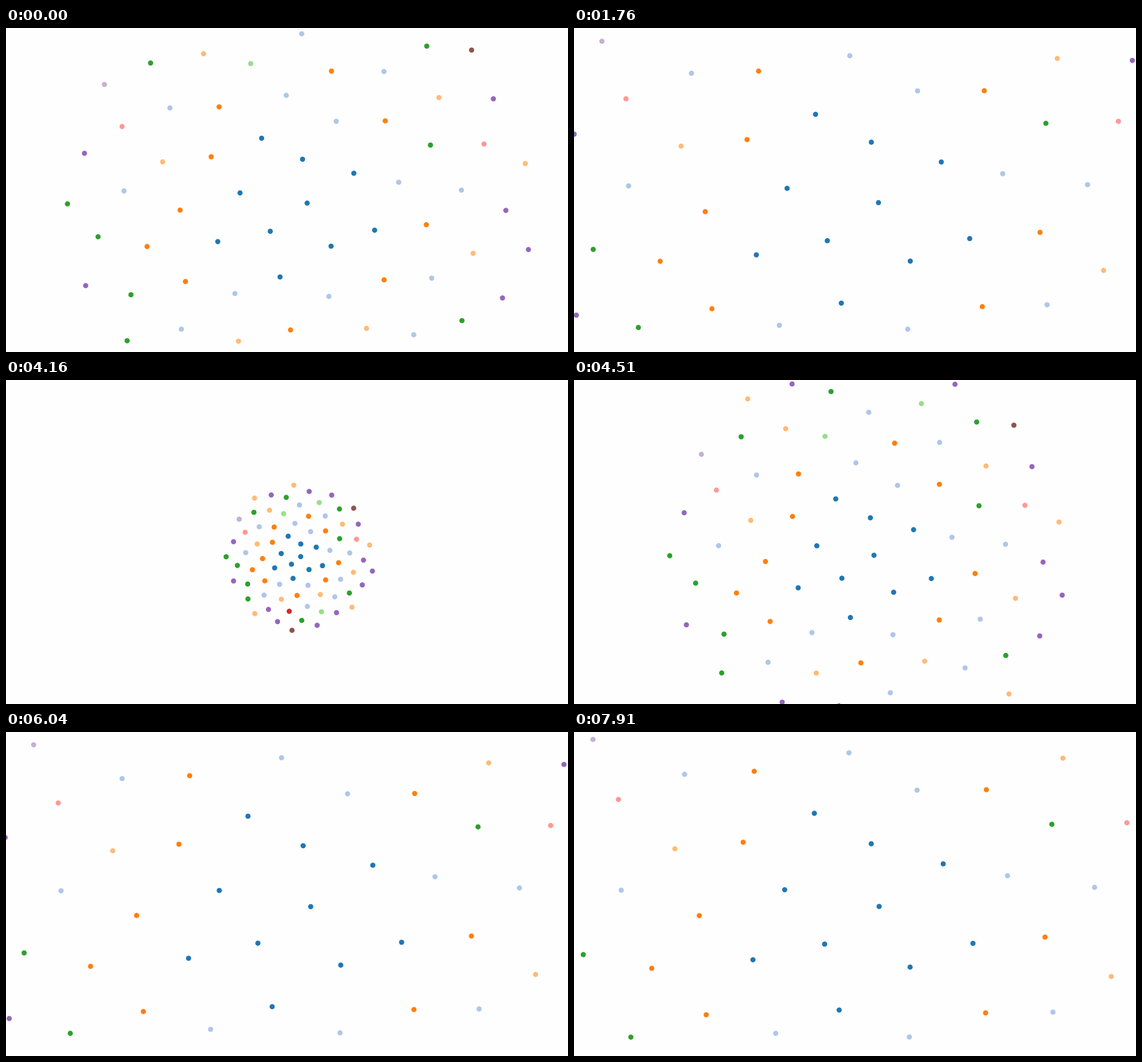
Recreate the animation shown at these times as an HTML page with a canvas. Size 921x532 px, loop 8 s.

```html
<!DOCTYPE html>
<html lang="en">
<head>
<meta charset="utf-8">
<title>Spreading dots</title>
<style>
  html, body { margin: 0; width: 100%; height: 100%; overflow: hidden; background: #fefefe; }
  canvas { display: block; width: 921px; height: 532px; }
</style>
</head>
<body>
<canvas id="stage" width="921" height="532"></canvas>
<script>
const ctx = document.getElementById('stage').getContext('2d');
const LOOP = 8000, CLEARED = 3720, RESTART = 4040;
const RADIUS = 4.25, CENTER = [481, 291];
const TICKS = 300, MS_PER_TICK = 16.4;
const DECAY = 1 - Math.pow(0.001, 1 / TICKS);
const COLORS = {
  a: '#1f77b4', b: '#aec7e8', c: '#ff7f0e', d: '#ffbb78', e: '#2ca02c', f: '#98df8a',
  g: '#d62728', h: '#ff9896', i: '#9467bd', j: '#c5b0d5', k: '#8c564b'
};
const GROUPS = 'aaaaaaaaaabbcbbbccccccccddedfbcbbbbbbbbdgddeffhhieeeeeeieiiiiiiiiiijddddekkdi';

const mean = list => list.reduce((a, b) => a + b, 0) / list.length;

// --- mutual repulsion over a quadtree; theta2 = 0 sums every pair exactly ---
function buildTree(dots, x, y, w) {
  if (dots.length === 1) return { x: dots[0].x, y: dots[0].y, n: 1, w, dot: dots[0] };
  const h = w / 2, parts = [[], [], [], []];
  for (const p of dots) parts[(p.y >= y + h) * 2 + (p.x >= x + h)].push(p);
  const kids = [];
  parts.forEach((part, i) => {
    if (part.length) kids.push(buildTree(part, x + (i & 1) * h, y + (i >> 1) * h, h));
  });
  const cell = { x: 0, y: 0, n: dots.length, w, kids };
  for (const k of kids) {
    cell.x += k.x * k.n / cell.n;
    cell.y += k.y * k.n / cell.n;
  }
  return cell;
}

function repel(p, cell, force, theta2) {
  const dx = cell.x - p.x, dy = cell.y - p.y, l = dx * dx + dy * dy;
  const far = cell.w * cell.w < l * theta2;
  if (!far && cell.kids) {
    for (const k of cell.kids) repel(p, k, force, theta2);
  } else if (cell.dot !== p) {
    p.vx -= force * cell.n * dx / l;
    p.vy -= force * cell.n * dy / l;
  }
}

// Dots start on a sunflower spiral and drift apart while the force cools down.
function simulate(theta2) {
  const turn = Math.PI * (3 - Math.sqrt(5));
  const dots = Array.from(GROUPS, (g, i) => ({
    x: 10 * Math.sqrt(i) * Math.cos(i * turn),
    y: 10 * Math.sqrt(i) * Math.sin(i * turn),
    vx: 0, vy: 0
  }));
  const states = [];
  for (let t = 0, alpha = 1; t <= TICKS; t++) {
    states.push(dots.map(p => [p.x, p.y]));
    alpha *= 1 - DECAY;
    const xs = dots.map(p => p.x), ys = dots.map(p => p.y);
    const x0 = Math.floor(Math.min(...xs)), y0 = Math.floor(Math.min(...ys));
    let size = 1;
    while (Math.max(...xs) > x0 + size || Math.max(...ys) > y0 + size) size *= 2;
    const root = buildTree(dots, x0, y0, size);
    for (const p of dots) repel(p, root, 30 * alpha, theta2);
    const mx = mean(xs), my = mean(ys);
    for (const p of dots) {
      p.x += (p.vx *= 0.6) - mx;
      p.y += (p.vy *= 0.6) - my;
    }
  }
  return states;
}

// --- a run is scaled and shifted so that three outer dots settle on given points ---
const ANCHORS = [46, 47, 11];

function makeRun(theta2, tick0, time0, aims) {
  const states = simulate(theta2);
  const pts = ANCHORS.map(n => states[220][n]);
  const centroid = list => [0, 1].map(k => mean(list.map(p => p[k])));
  const a = centroid(pts), b = centroid(aims);
  const size = (list, c) => Math.hypot(...list.map(p => Math.hypot(p[0] - c[0], p[1] - c[1])));
  const scale = size(aims, b) / size(pts, a);
  const shift = [0, 1].map(k => b[k] - CENTER[k] - a[k] * scale);
  return { states, tick0, time0, scale, shift };
}

const exactRun = makeRun(0, 29.6, 0, [[78.5, 114], [899.6, 149.2], [547.6, 499]]);
const quickRun = makeRun(0.81, 2, 4160, [[73, 111], [905.8, 149], [549.5, 500.5]]);

function draw(time) {
  ctx.fillStyle = '#fefefe';
  ctx.fillRect(0, 0, 921, 532);
  if (time >= CLEARED && time < RESTART) return;
  const run = time < CLEARED ? exactRun : quickRun;
  const tick = Math.min(TICKS - 1, Math.max(1, run.tick0 + (time - run.time0) / MS_PER_TICK));
  const step = Math.floor(tick), part = tick - step;
  const grow = Math.sqrt(1 - Math.pow(1 - DECAY, tick));
  const scale = 1 + (run.scale - 1) * grow;
  Array.from(GROUPS).forEach((group, i) => {
    const from = run.states[step][i], to = run.states[step + 1][i];
    const [x, y] = [0, 1].map(k =>
      CENTER[k] + run.shift[k] * grow + (from[k] + (to[k] - from[k]) * part) * scale);
    ctx.fillStyle = COLORS[group];
    ctx.beginPath();
    ctx.arc(x, y, RADIUS, 0, 2 * Math.PI);
    ctx.fill();
  });
}

// The picture is refreshed in beats: from this moment on, with this period.
const BEATS = [[0, 80], [80, 118], [910, 139], [CLEARED, 320], [RESTART, 120], [4210, 108], [4855, 117]];

function beatAt(now) {
  const [from, period] = BEATS.filter(b => b[0] <= now).pop();
  return from + Math.floor((now - from) / period) * period;
}

let shown = -1;
const start = performance.now();
function loop() {
  const beat = beatAt((performance.now() - start) % LOOP);
  if (beat !== shown) draw(shown = beat);
  requestAnimationFrame(loop);
}
loop();
</script>
</body>
</html>
```
